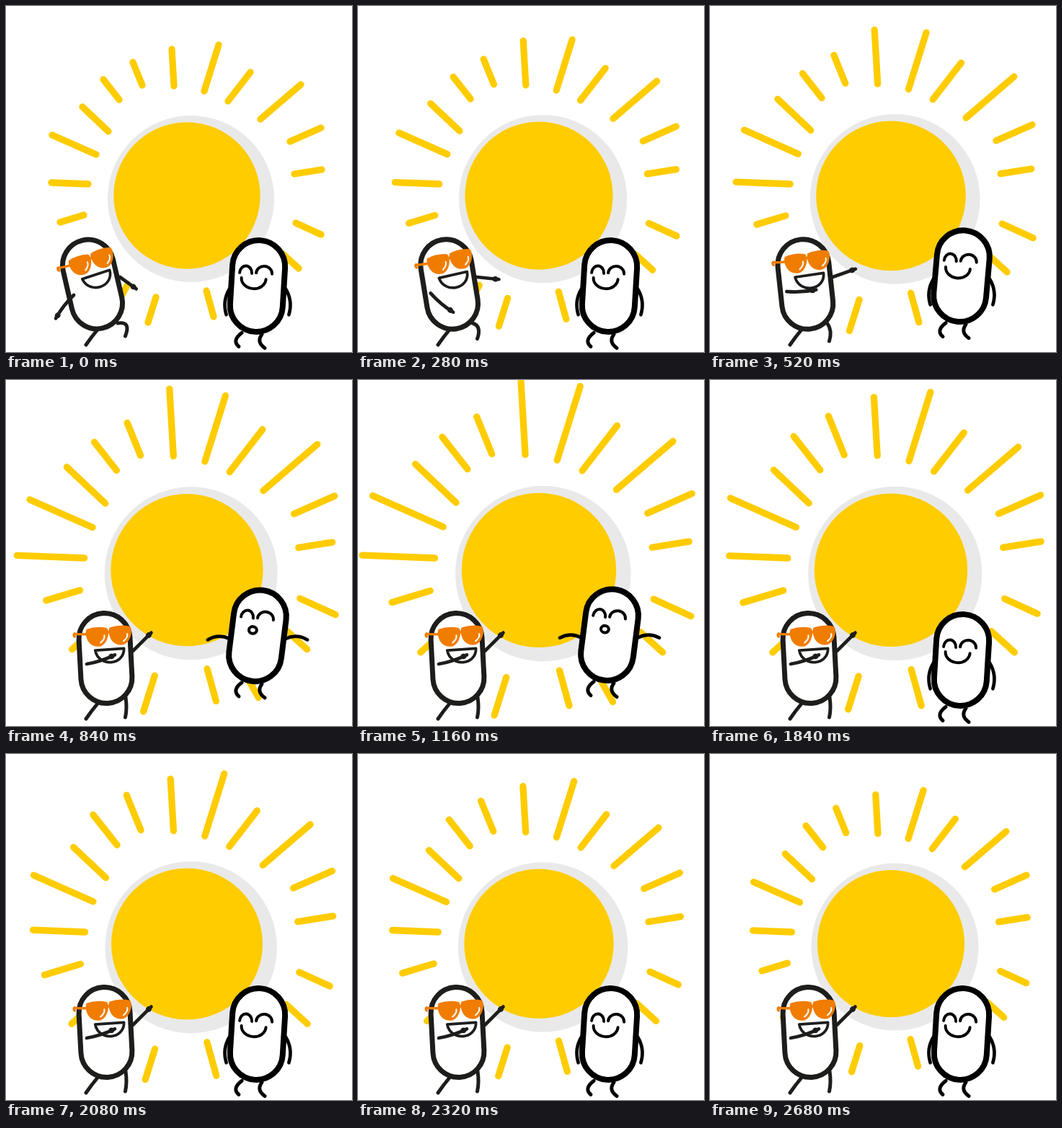
Recreate the animation shown at these times as an HTML page with a canvas. Size 480 by 480 pixels, loop 2.72 s.

```html
<!DOCTYPE html>
<html lang="en">
<head>
<meta charset="utf-8">
<title>Sunny dance</title>
<style>
html, body { margin: 0; height: 100%; overflow: hidden; background: #fff; }
canvas { display: block; }
</style>
</head>
<body>
<canvas id="stage" width="480" height="480"></canvas>
<script>
const ctx = document.getElementById('stage').getContext('2d');
const LOOP = 2720, WAVE_END = 2850;
const YELLOW = '#ffcc00', ORANGE = '#f07d00', BLACK = '#000', SOFT_BLACK = '#1d1d1b';

// Rays that grow together, each from its inner end to its resting tip
const rayGroups = [
  { peak: 1060, growth: 46, rays: [[114, 247, 63, 245], [233, 111, 230, 60]] },
  { peak: 1060, growth: 25, rays: [[142, 174, 106, 140], [308, 132, 339, 92], [353, 157, 409, 109]] },
  { peak: 1060, growth: 16, rays: [[402, 301, 437, 317], [208, 404, 197, 439], [169, 386, 152, 417]] },
  { peak: 1380, growth: 39, rays: [[125, 206, 64, 179], [275, 118, 295, 54]] },
  { peak: 1380, growth: 19, rays: [[394, 188, 437, 169]] },
  { peak: 1640, growth: 24, rays: [[157, 130, 135, 102], [189, 110, 176, 78], [108, 290, 75, 300]] },
  { peak: 1640, growth: 14, rays: [[400, 233, 438, 227], [384, 344, 406, 364], [330, 404, 343, 427],
    [278, 395, 288, 431], [124, 345, 103, 364]] }
];

const mix = (a, b, u) => a + (b - a) * u;

function smooth(from, to, t) {
  const u = Math.min(Math.max((t - from) / (to - from), 0), 1);
  return u * u * (3 - 2 * u);
}

// Rises to 1 at the peak and falls again, halfway between linear and cosine
function wave(t, peak) {
  const u = t < peak ? t / peak : (WAVE_END - t) / (WAVE_END - peak);
  return mix(u, (1 - Math.cos(Math.PI * u)) / 2, .5);
}

function placed(x, y, degrees, draw) {
  ctx.save();
  ctx.translate(x, y);
  ctx.rotate(degrees * Math.PI / 180);
  draw();
  ctx.restore();
}

function stroke(color, width) {
  ctx.strokeStyle = color;
  ctx.lineWidth = width;
  ctx.stroke();
}

function disc(x, y, r, color) {
  ctx.beginPath();
  ctx.arc(x, y, r, 0, 7);
  ctx.fillStyle = color;
  ctx.fill();
}

// Curve passing through its middle point
function curve(color, width, x1, y1, mx, my, x2, y2) {
  ctx.beginPath();
  ctx.moveTo(x1, y1);
  ctx.quadraticCurveTo(2 * mx - (x1 + x2) / 2, 2 * my - (y1 + y2) / 2, x2, y2);
  stroke(color, width);
}

function ellipse(x, y, rx, ry, from, to) {
  ctx.beginPath();
  ctx.ellipse(x, y, rx, ry, 0, from * Math.PI, to * Math.PI);
  stroke(BLACK, 4);
}

function arm(color, x, y, angle, length, bow) {
  placed(x, y, angle, () => curve(color, 4.7, 0, 0, length / 2, bow, length, 0));
}

function handedArm(x, y, angle, length, bow) {
  arm(SOFT_BLACK, x, y, angle, length, bow);
  placed(x, y, angle, () => disc(length - 5, bow * .3, 3.8, SOFT_BLACK));
}

function capsule(color, width, w, h) {
  ctx.beginPath();
  ctx.roundRect(-w / 2, -h / 2, w, h, w / 2);
  ctx.fillStyle = '#fff';
  ctx.fill();
  stroke(color, width);
}

function drawSun(t) {
  const swell = wave(t, 1380), scale = 1 + .061 * swell;
  ctx.save();
  ctx.translate(251, 263 + swell);
  ctx.scale(scale, scale);
  disc(5.5, 4.5, 115.5, '#e9e9e9');
  disc(0, 0, 101.7, YELLOW);
  ctx.translate(-251, -263);
  for (const { peak, growth, rays } of rayGroups) {
    for (const [x1, y1, x2, y2] of rays) {
      const k = 1 + growth * wave(t, peak) / Math.hypot(x2 - x1, y2 - y1);
      ctx.beginPath();
      ctx.moveTo(x1, y1);
      ctx.lineTo(mix(x1, x2, k), mix(y1, y2, k));
      stroke(YELLOW, 9.3 / scale);
    }
  }
  ctx.restore();
}

function lens(x) {
  ctx.beginPath();
  ctx.moveTo(x - 14, -11);
  ctx.quadraticCurveTo(x, -15, x + 14, -11);
  ctx.bezierCurveTo(x + 19, -7, x + 14, 13, x + 2, 14);
  ctx.bezierCurveTo(x - 14, 15, x - 18, -4, x - 14, -11);
  ctx.fillStyle = ORANGE;
  ctx.fill();
  curve('#fff', 2, x + 10, -1, x + 9, 4, x + 4, 9);
}

function shadesAndGrin() {
  ctx.beginPath();
  ctx.moveTo(-20, 19);
  ctx.lineTo(20, 19);
  ctx.bezierCurveTo(19, 43, -17, 43, -20, 19);
  ctx.closePath();
  stroke(SOFT_BLACK, 3.7);
  lens(-16);
  lens(16);
  curve(ORANGE, 3.5, -3, -4, 0, -5, 3, -4);
  curve(ORANGE, 3.5, -30, -4, -42, -5, -47, -6);
  curve(ORANGE, 3.5, -47, -6, -48, -4, -47, -2);
}

// Swings from a stride into a pointing pose on planted feet
function drawLeft(t) {
  const u = Math.min(t / 760, 1), armSwing = 1 - (1 - u) ** 2;
  curve(SOFT_BLACK, 5, 127, 449, 119, 459, 111, 470);
  curve(SOFT_BLACK, 5, 155 + 11 * u, 440, 167, 443 + 12 * u, 165.5, 458 + 10 * u);
  placed(mix(120, 138, u), 386, 0, () => {
    placed(0, 0, mix(-13, -3, u), () => {
      capsule(SOFT_BLACK, 7, 71, 125);
      placed(6, -31, mix(-5, -1, u), shadesAndGrin);
    });
    handedArm(-26, mix(15, 8, u), mix(128, -18, armSwing), 41, 1.5);
    handedArm(38, -10, mix(36, -45, u), mix(28, 36, u), 0);
  });
}

function happyFace(lift) {
  const eyeY = -17 - 7 * lift;
  ellipse(-17.5, eyeY, 8.5, 10, 1, 2);
  ellipse(8, eyeY - 1, 11, 10, 1, 2);
  if (lift > .75) ellipse(-7.5, -7, 5.5, 4.8, 0, 2);
  else ellipse(-6, -10 - 2 * lift, 17, 14, 0, 1);
}

// Hops once with raised arms
function drawRight(t) {
  const lift = Math.sin(Math.PI * Math.min(Math.max((t - 360) / 1320, 0), 1));
  const raise = smooth(540, 880, t) - smooth(1500, 1670, t);
  placed(349, 388.5 - 37 * lift, 0, () => {
    curve(BLACK, 5, -22, 65, -30, 75, -26, 84);
    curve(BLACK, 5, 6, 67, 3, 77, 10, 86);
    for (const side of [-1, 1]) {
      arm(BLACK, side * 39, 4, 90 - side * (7 + 83 * raise), 36 - 6 * raise, -4 * side);
    }
    placed(0, 0, 3.5 + 4 * lift, () => {
      capsule(BLACK, 8, 73, 127);
      happyFace(lift);
    });
  });
}

function frame() {
  const t = (performance.now() - start) % LOOP;
  ctx.clearRect(0, 0, 480, 480);
  ctx.lineCap = ctx.lineJoin = 'round';
  drawSun(t);
  drawLeft(t);
  drawRight(t);
  requestAnimationFrame(frame);
}

const start = performance.now();
frame();
</script>
</body>
</html>
```
